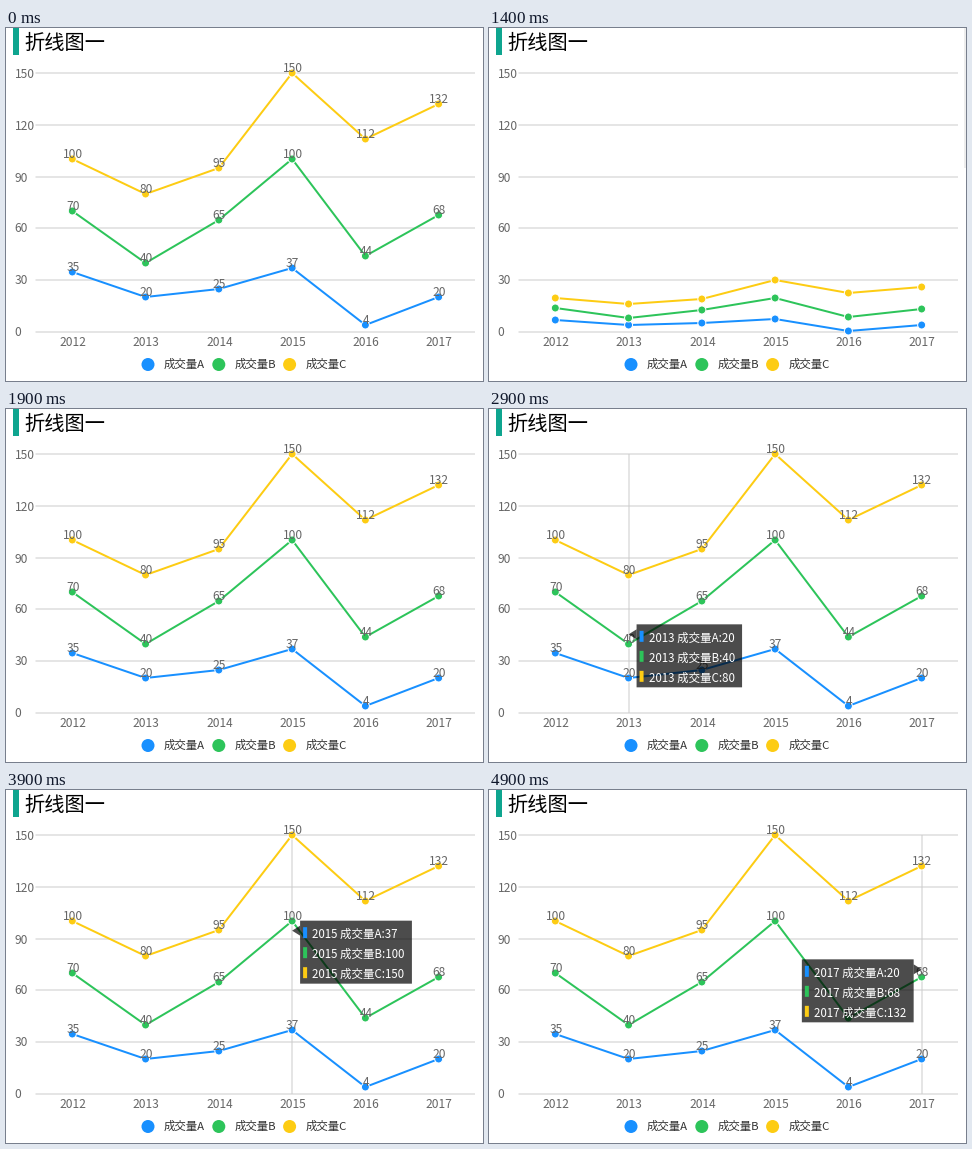
A matplotlib script that plays this animation: 477x353 px, repeating every 5900 ms.

```python
import math

import matplotlib.pyplot as plt
from matplotlib.animation import FuncAnimation
from matplotlib.patches import Circle, Polygon, Rectangle

WIDTH, HEIGHT, DPI = 477, 353, 64
PT = 72 / DPI  # points per pixel
FRAMES, INTERVAL = 59, 100

YEARS = range(2012, 2018)
SERIES = [
    ("成交量A", "#1890ff", (35, 20, 25, 37, 4, 20)),
    ("成交量B", "#2dc45a", (70, 40, 65, 100, 44, 68)),
    ("成交量C", "#fdcc13", (100, 80, 95, 150, 112, 132)),
]
TOP, BASE = 45, 304
SCALE = (BASE - TOP) / 150
XS = [66.3 + 73.27 * k for k in range(6)]
GRID, GREY, DARK = "#cccccc", "#666666", "#333333"

GROW_START, GROW_END = 10, 19
TIP_START, TIP_STEP = 24, 5

plt.rcParams["font.family"] = "Noto Sans CJK JP"
fig = plt.figure(figsize=(WIDTH / DPI, HEIGHT / DPI), dpi=DPI, facecolor="white")
ax = fig.add_axes([0, 0, 1, 1])


def write(x, baseline, text, size, color, ha="left"):
    ax.text(x, baseline, text, fontsize=size * PT, color=color,
            ha=ha, va="baseline", zorder=len(ax.get_children()))


def line(xs, ys, color, width=1, cap="round"):
    ax.plot(xs, ys, color=color, lw=width * PT, solid_capstyle=cap,
            solid_joinstyle="round", snap=False, zorder=len(ax.get_children()))


def add(patch):
    patch.set(zorder=len(ax.get_children()), snap=False)
    ax.add_patch(patch)


def box(x, y, w, h, color, alpha=1):
    add(Rectangle((x, y), w, h, fc=color, lw=0, alpha=alpha))


def level(value, progress=1):
    return BASE - math.floor(value * SCALE * progress + 0.5)


def growth(step):
    """Cubic ease-in of the rising lines."""
    return min(1, 0.15 + 0.1125 * step - 0.001 * step ** 2) ** 3


def draw_background():
    box(7, 0, 6, 27, "#0ea58f")
    write(18, 21, "折线图一", 20.2, "black")
    for k in range(6):
        y = level(30 * k)
        line([29.5, 469], [y, y], GRID, cap="butt")
        write(8.7, y + 4.5, str(30 * k), 12, GREY)
    for x, year in zip(XS, YEARS):
        write(x + 0.5, 318, str(year), 12, GREY, "center")
    for k, (name, color, _) in enumerate(SERIES):
        add(Circle((142 + 70.8 * k, 336.5), 6.5, fc=color, lw=0))
        write(158 + 70.7 * k, 340, name, 11.4, DARK)


def draw_series(progress):
    for _, color, values in SERIES:
        ys = [level(v, progress) for v in values]
        line(XS, ys, color, 2)
        for x, y in zip(XS, ys):
            add(Circle((x, y), 4, fc=color, ec="white", lw=PT))
    if progress == 1:
        for _, _, values in SERIES:
            for x, v in zip(XS, values):
                write(x + 0.5, level(v) - 1, str(v), 12, GREY, "center")


def draw_tooltip(index):
    x = XS[index]
    values = [s[2][index] for s in SERIES]
    top = sum(map(level, values)) / 3 - 8
    width = 105.5 + 6.3 * (len(str(max(values))) - 2)
    flipped = index == len(XS) - 1
    side = -8 if flipped else 8
    left = x - 8 - width if flipped else x + 8
    box(left, top, width, 63, "black", 0.7)
    add(Polygon([(x, top + 10), (x + side, top + 5), (x + side, top + 15)],
                fc="black", lw=0, alpha=0.7))
    for k, ((name, color, _), value) in enumerate(zip(SERIES, values)):
        middle = top + 12 + 20 * k
        box(left + 3, middle - 5.5, 4, 11, color)
        write(left + 12, middle + 5, f"{YEARS[index]} {name}:{value}", 11.45, "white")


def draw(i):
    ax.clear()
    ax.set(xlim=(0, WIDTH), ylim=(HEIGHT, 0))
    ax.axis("off")
    draw_background()
    tip = min(5, (i - TIP_START) // TIP_STEP) if i >= TIP_START else None
    if tip is not None:
        line([round(XS[tip])] * 2, [TOP, BASE], GRID, cap="butt")
    step = i - GROW_START
    growing = GROW_START <= i < GROW_END
    draw_series(growth(step) if growing else 1)
    if growing and step < 5:  # fading scroll bar
        box(475, 0, 2, 140, "black", min(0.25, 0.09 * (5 - step) - 0.02))
    if tip is not None:
        draw_tooltip(tip)
    return []


anim = FuncAnimation(fig, draw, frames=FRAMES, interval=INTERVAL,
                     init_func=lambda: draw(0), repeat=True, repeat_delay=0)
plt.show()
```
